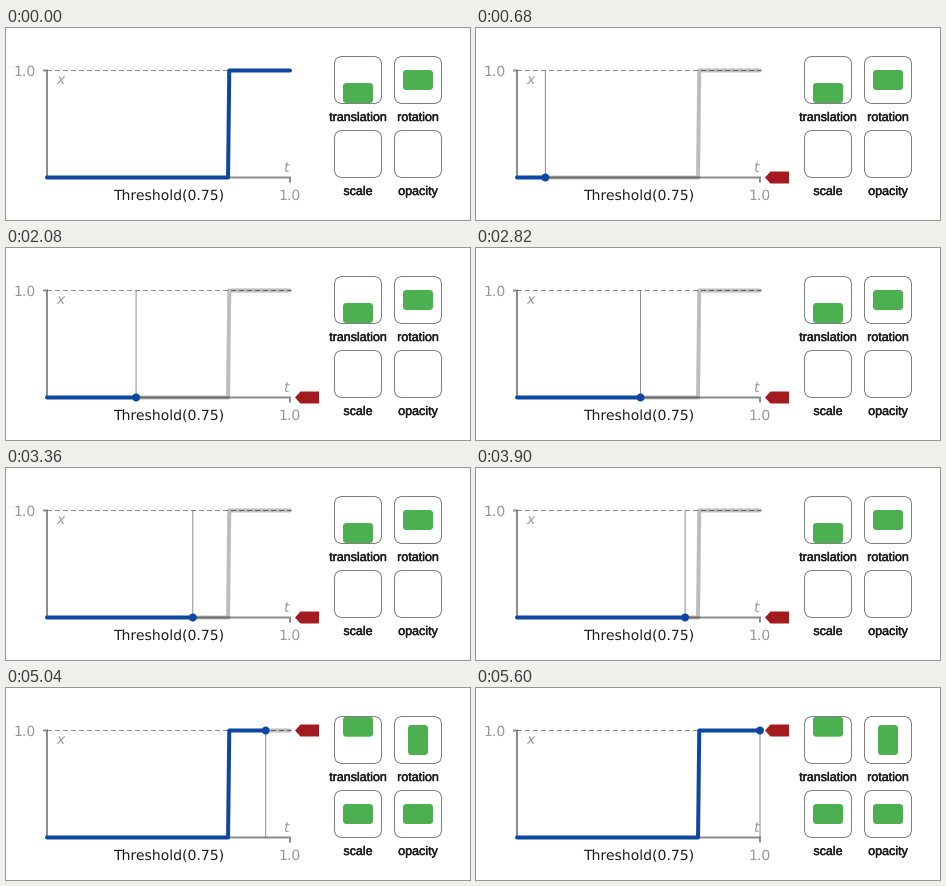
A matplotlib script that plays this animation: 464 px wide and 192 px high, repeating every 5.62 s.

```python
import matplotlib.pyplot as plt
from matplotlib.animation import FuncAnimation
from matplotlib.patches import Circle, FancyBboxPatch, Polygon
from matplotlib.patheffects import withStroke

W, H, DPI = 464, 192, 64
PX = 72 / DPI  # one pixel in points
LEFT, RIGHT, TOP, BOTTOM = 41, 284, 42.5, 149.5
THRESHOLD, STEPS = 0.75, 120
STEP_X = LEFT + THRESHOLD * (RIGHT - LEFT)
BLUE, RED, GREEN = "#0d47a1", "#a31b1e", "#4caf50"

plt.rcParams["path.snap"] = False
plt.rcParams["text.hinting"] = "none"
plt.rcParams["font.family"] = "DejaVu Sans"

fig = plt.figure(figsize=(W / DPI, H / DPI), dpi=DPI, facecolor="white")
ax = fig.add_axes([0, 0, 1, 1])
ax.set(xlim=(0, W), ylim=(H, 0))
ax.axis("off")


def stroke(points, width, color, z, **style):
    line, = ax.plot(*zip(*points), lw=width * PX, color=color, zorder=z, **style)
    return line


def label(x, y, text, color, size=14, **style):
    return ax.text(x, y, text, color=color, fontsize=size * PX,
                   va="baseline", zorder=2, **style)


def rounded(x, y, w, h, radius, **style):
    box = FancyBboxPatch((x, y), w, h,
                         boxstyle=f"round,pad=0,rounding_size={radius}", **style)
    return ax.add_patch(box)


# Chart
shade = (0, 0, 0, 0.45)
stroke([(LEFT - 4, TOP), (LEFT, TOP), (LEFT, BOTTOM), (RIGHT, BOTTOM),
        (RIGHT, BOTTOM + 5)], 2, shade, 1,
       solid_capstyle="butt", solid_joinstyle="miter")
stroke([(LEFT, TOP), (RIGHT + 1, TOP)], 1, shade, 1, dashes=(5, 3))

GRAY = "#999999"
label(29.5, 48, "1.0", GRAY, ha="right")
label(283.5, 171.5, "1.0", GRAY, ha="center")
label(50.5, 55.5, "x", GRAY, style="italic")
label(277.5, 144, "t", GRAY, style="italic")
label(162.5, 172, "Threshold(0.75)", "#1c1c1c", ha="center")

round_ends = dict(solid_capstyle="round", solid_joinstyle="round")
rest = stroke([(0, 0)], 4, (0, 0, 0, 0.26), 3, **round_ends)
cursor = stroke([(0, 0)], 1, shade, 4, solid_capstyle="butt")
done = stroke([(0, 0)], 4, BLUE, 5, **round_ends)
dot = ax.add_patch(Circle((0, 0), 4, fc=BLUE, lw=0, zorder=6))
marker = ax.add_patch(Polygon([(0, 0)], fc=RED, lw=0, zorder=6))

# Tiles
blocks = {}
for name, x, y in [("translation", 328, 28), ("rotation", 388, 28),
                   ("scale", 328, 102), ("opacity", 388, 102)]:
    blocks[name] = rounded(x + 9, y + 14, 30, 20, 3.5, fc=GREEN, lw=0, zorder=2)
    rounded(x + 0.5, y + 0.5, 47, 47, 8, fc="none", ec="#808080", lw=PX, zorder=3)
    text = label(x + 24, y + 65, name, "#1c1c1c", 12.5, ha="center",
                 family="Liberation Sans")
    text.set_path_effects([withStroke(linewidth=0.45 * PX, foreground="#1c1c1c")])


def step_at(tick):
    """Three steps per seven ticks, the middle one held for five."""
    cycle, part = divmod(tick, 7)
    return 3 * cycle + (part > 0) + (part > 5)


def draw(tick):
    n = step_at(tick)
    t = n / STEPS
    x = LEFT + t * (RIGHT - LEFT)
    on = t >= THRESHOLD
    y = TOP if on else BOTTOM

    start, end = (LEFT, BOTTOM), (RIGHT, TOP)
    rise = [(STEP_X - 1.2, BOTTOM), (STEP_X, TOP)]
    moving = n > 0
    if not moving:
        past, future = [start, *rise, end], [end]
    elif on:
        past, future = [start, *rise, (x, y)], [(x, y), end]
    else:
        past, future = [start, (x, y)], [(x, y), *rise, end]
    done.set_data(*zip(*past))
    rest.set_data(*zip(*future))
    cursor.set_data([x, x], [TOP, BOTTOM])
    dot.center = x, y
    marker.set_xy([(289, y), (294.5, y - 6), (313, y - 6),
                   (313, y + 6), (294.5, y + 6)])
    rest.set_visible(moving and n < STEPS)
    for part in (cursor, dot, marker):
        part.set_visible(moving)

    blocks["translation"].set_y(28.7 if on else 55)
    blocks["rotation"].set_bounds(*((402, 37, 20, 30) if on else (397, 42, 30, 20)))
    blocks["scale"].set_visible(on)
    blocks["opacity"].set_visible(on)
    return []


anim = FuncAnimation(fig, draw, frames=281, interval=20, repeat=True,
                     repeat_delay=0, cache_frame_data=False)
plt.show()
```
